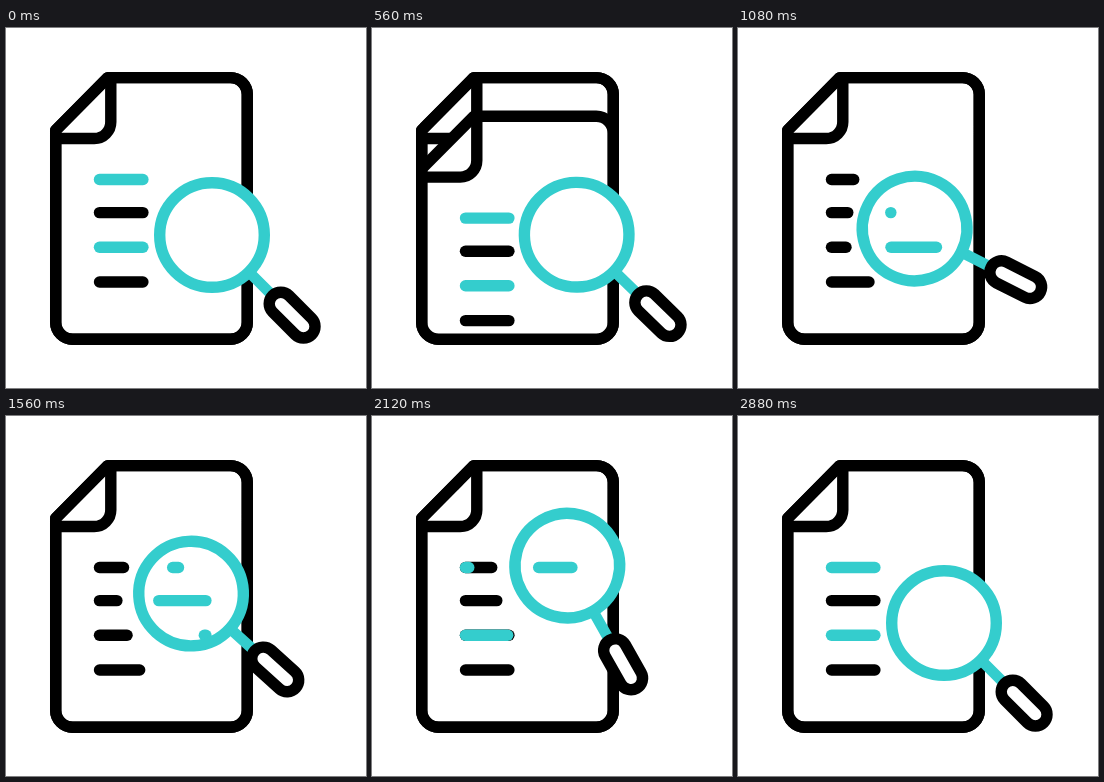
Animation of 360 by 360 pixels, one loop 3 s. Source, as an HTML page:

```html
<!DOCTYPE html>
<html lang="en">
<head>
<meta charset="utf-8">
<title>Document search</title>
<style>
  html, body { margin: 0; width: 100%; height: 100%; overflow: hidden; background: #fff; }
  svg { display: block; width: 100%; height: 100%; }
  .ink, .teal { stroke-width: 11.4; stroke-linecap: round; stroke-linejoin: round; fill: none; }
  .ink { stroke: #000; }
  .teal { stroke: #34cdcd; }
  .paper { fill: #fff; }
</style>
</head>
<body>
<svg viewBox="0 0 360 360">
  <defs>
    <path id="outline" d="M101.9 49.6H224.3a17 17 0 0 1 17 17V294.2a17 17 0 0 1 -17 17H66.7a17 17 0 0 1 -17 -17V102.2Z"/>
    <path id="fold" d="M49.7 110.5H88.3a16.5 16.5 0 0 0 16.5 -16.5V49.6"/>
    <clipPath id="inPage"><use href="#outline"/></clipPath>
    <clipPath id="inLens"><circle id="lensClip" r="52.3"/></clipPath>
  </defs>

  <use href="#outline" class="ink paper"/>
  <use href="#fold" class="ink"/>
  <g id="rows"></g>

  <g clip-path="url(#inPage)">
    <g id="sheet">
      <use href="#outline" class="ink paper"/>
      <use href="#fold" class="ink"/>
    </g>
  </g>
  <use href="#outline" class="ink"/>

  <circle id="glass" class="paper" r="52.3"/>
  <g id="found" clip-path="url(#inLens)"></g>
  <g id="lens">
    <path class="teal" d="M52.3 0H86" style="stroke-width:10.8"/>
    <circle class="teal" r="52.3"/>
    <rect class="ink paper" x="85.7" y="-11.6" width="55.2" height="23.2" rx="11.6"/>
  </g>
</svg>
<script>
const LOOP = 3000;
const LEFT = 93.5, RIGHT = 136.9;
const ROW_Y = [151.5, 184.6, 219.2, 254];
const $ = id => document.getElementById(id);

// Lens centre, handle angle and the right end of each text row
const REST = [206, 207, 45, RIGHT, RIGHT, RIGHT, RIGHT];
const LOW = [176.6, 200.6, 26.8, 115.7, 109.8, 108, 131];
const HIGH = [195.3, 149.6, 60.5, 119.7, 124.8, RIGHT, RIGHT];

function addLine(parent, cls, y, x1 = LEFT, x2 = RIGHT) {
  const line = document.createElementNS("http://www.w3.org/2000/svg", "line");
  line.setAttribute("class", cls);
  parent.append(line);
  span(line, x1, x2);
  line.setAttribute("y1", y);
  line.setAttribute("y2", y);
  return line;
}

function span(line, x1, x2) {
  line.setAttribute("x1", x1);
  line.setAttribute("x2", Math.max(x2, x1 + 0.01));
}

function show(el, on) {
  el.style.display = on ? "" : "none";
}

// Eased progress from 0 to 1 between two times
function ease(t, from, to) {
  const p = Math.min(1, Math.max(0, (t - from) / (to - from)));
  return p < 0.5 ? 4 * p ** 3 : 1 - 4 * (1 - p) ** 3;
}

const mix = (a, b, k) => a.map((v, i) => v + (b[i] - v) * k);

const rows = ROW_Y.map(y => addLine($("rows"), "ink", y));
const marks = [
  { row: 0, start: 2020, end: 2400 },
  { row: 2, start: 1740, end: 2210 }
].map(m => ({ ...m, line: addLine($("rows"), "teal", ROW_Y[m.row]) }));

ROW_Y.forEach((y, i) => addLine($("sheet"), i % 2 ? "ink" : "teal", y));

// Text seen through the glass: drawn in, then wiped out, left to right
const found = [
  { y: ROW_Y[0], x: 166.7, grow: [1480, 1710], wipe: [2120, 2560] },
  { y: ROW_Y[1], x: 152.8, grow: [1060, 1440], wipe: [1600, 1950] },
  { y: ROW_Y[2], x: 153, grow: [760, 1160], wipe: [1250, 1640] }
].map(f => ({ ...f, line: addLine($("found"), "teal", f.y) }));
const FOUND_END = 199.9;

function pose(t) {
  if (t < 1300) return mix(REST, LOW, ease(t, 440, 980));
  if (t < 2000) {
    const k = ease(t, 1300, 1840);
    const p = mix(LOW, HIGH, k);
    p[4] -= 23 * k * (1 - k); // this row waits while the glass bulges past it
    return p;
  }
  return mix(HIGH, REST, ease(t, 2090, 2700));
}

function draw(t) {
  const [x, y, angle, ...ends] = pose(t);

  const drop = 268 * ease(t, 310, 1070);
  $("sheet").setAttribute("transform", `translate(0 ${drop})`);
  show($("sheet"), t < 1070);

  rows.forEach((line, i) => span(line, LEFT, ends[i]));
  for (const m of marks) {
    const k = ease(t, m.start, m.end);
    show(m.line, k > 0);
    show(rows[m.row], k < 1);
    span(m.line, LEFT, Math.min(ends[m.row], LEFT + (RIGHT - LEFT) * k));
  }

  for (const f of found) {
    const width = FOUND_END - f.x;
    show(f.line, t > f.grow[0] && t < f.wipe[1]);
    span(f.line, f.x + width * ease(t, ...f.wipe), f.x + width * ease(t, ...f.grow));
  }

  for (const el of [$("glass"), $("lensClip")]) {
    el.setAttribute("cx", x);
    el.setAttribute("cy", y);
  }
  $("lens").setAttribute("transform", `translate(${x} ${y}) rotate(${angle})`);
}

function tick() {
  draw(performance.now() % LOOP);
  requestAnimationFrame(tick);
}
tick();
</script>
</body>
</html>
```
